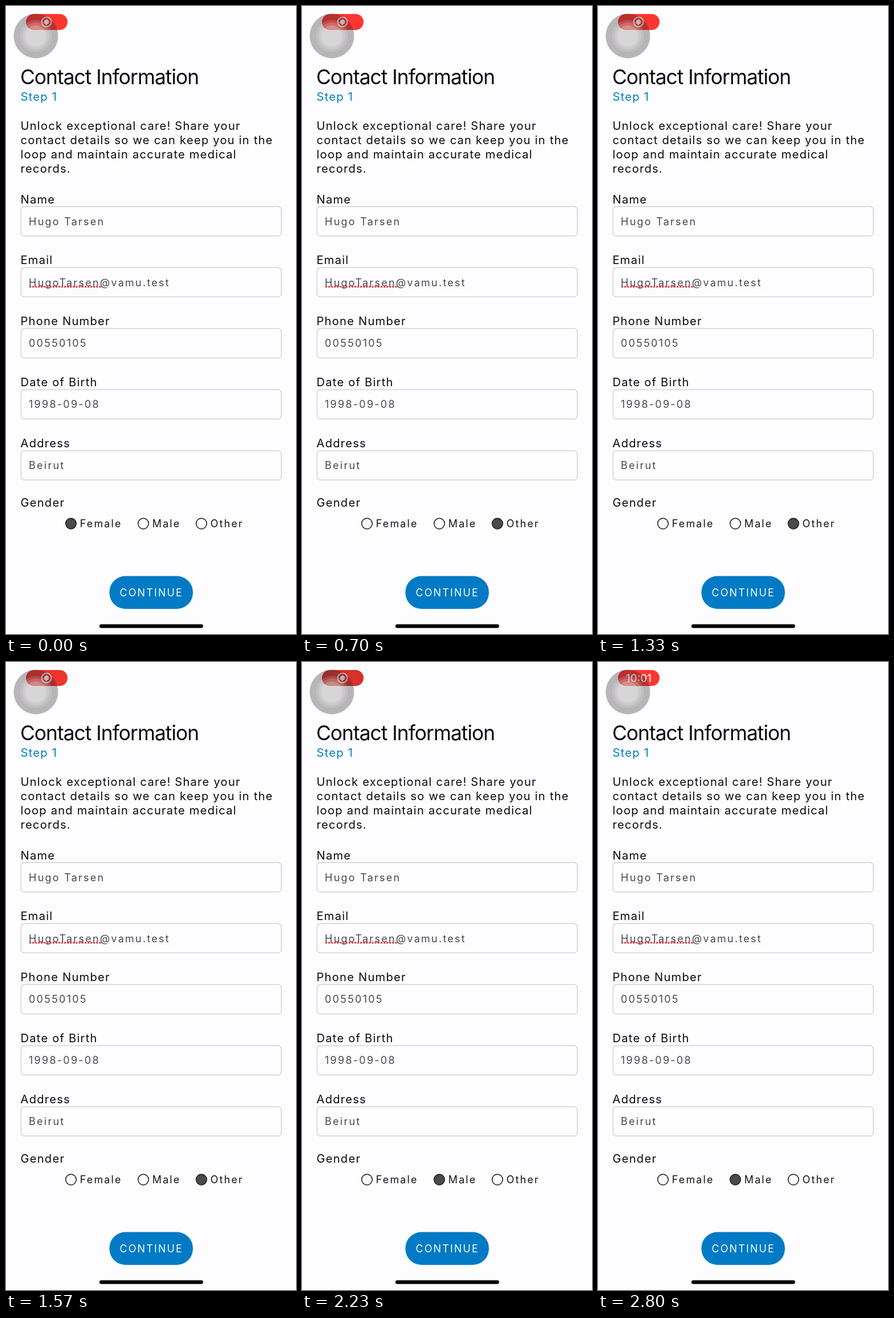
An HTML page that plays this animation: 509 px wide and 1100 px high, repeating every 2830 ms.

```html
<!DOCTYPE html>
<html lang="en">
<head>
<meta charset="utf-8">
<title>Contact form</title>
<style>
  html, body { margin: 0; width: 100%; height: 100%; overflow: hidden; background: #fdfcff; }
  svg { display: block; width: 100%; height: 100%; }
  text { font-family: Inter, Roboto, sans-serif; white-space: pre; }
  .title { font-size: 35.4px; letter-spacing: -1px; fill: #08080a; }
  .body { font-size: 20.2px; letter-spacing: 1.2px; fill: #0c0c0e; }
  .step { fill: #007dbc; }
  .value { font-size: 18px; letter-spacing: 2.25px; fill: #48474b; }
  .option { font-size: 18px; letter-spacing: 2.1px; fill: #131315; }
  .button { font-size: 18px; letter-spacing: 2.1px; fill: #f4faff; }
  .clock { font-size: 18.5px; font-weight: 500; fill: #fff; text-anchor: middle; }
  .box { fill: none; stroke: #d5d1d8; stroke-width: 1.5; }
  .radio { stroke: #19191b; stroke-width: 1.5; }
</style>
</head>
<body>
<svg id="stage" viewBox="0 0 509 1100">
  <rect width="509" height="1100" fill="#fdfcff"/>

  <rect id="pill" x="35" y="14" width="73" height="28" rx="14"/>
  <g id="record">
    <circle cx="71" cy="28" r="8.4" fill="none" stroke="#fff" stroke-width="1.9"/>
    <circle cx="71" cy="28" r="4.4" fill="#fff"/>
  </g>
  <text id="clock" class="clock" x="71.5" y="34.7">10:01</text>

  <g id="touch">
    <circle cx="52.5" cy="52.5" r="39" fill="#2d2628" fill-opacity=".33"/>
    <circle cx="52.5" cy="52.5" r="28" fill="#fff" fill-opacity=".14"/>
    <circle cx="52.5" cy="52.5" r="23.5" fill="#fff" fill-opacity=".16"/>
    <circle cx="52.5" cy="52.5" r="18.5" fill="#fff" fill-opacity=".22"/>
  </g>

  <g id="form"></g>

  <rect x="181.5" y="998.5" width="146.5" height="57.5" rx="28" fill="#007ac5"/>
  <text class="button" x="199.5" y="1033.5">CONTINUE</text>
  <rect x="164" y="1083" width="182" height="6.6" rx="3.3" fill="#050506"/>
</svg>

<script>
const LOOP = 2830;
const $ = id => document.getElementById(id);
const form = $('form');

function add(tag, attrs, content = '') {
  const el = document.createElementNS('http://www.w3.org/2000/svg', tag);
  for (const key in attrs) el.setAttribute(key, attrs[key]);
  el.textContent = content;
  form.appendChild(el);
  return el;
}

const label = (cls, x, y, str) => add('text', { class: cls, x, y }, str);

label('title', 25, 136.8, 'Contact Information');
label('body step', 25.5, 165.5, 'Step 1');

[
  'Unlock exceptional care! Share your',
  'contact details so we can keep you in the',
  'loop and maintain accurate medical',
  'records.'
].forEach((line, i) => label('body', 25.5, 217 + i * 25, line));

[
  ['Name', 'Hugo Tarsen'],
  ['Email', 'HugoTarsen@vamu.test'],
  ['Phone Number', '00550105'],
  ['Date of Birth', '1998-09-08'],
  ['Address', 'Beirut']
].forEach(([name, value], i) => {
  const y = 351 + i * 106.9;
  label('body', 25.5, y - 5.5, name);
  add('rect', { class: 'box', x: 26.3, y: y + .3, width: 457, height: 51.4, rx: 6 });
  label('value', 40, y + 32.6, value);
});

// Spell-check dots under the email user name
add('path', {
  d: 'M42.5 491.7H165', fill: 'none', stroke: '#e2383a',
  'stroke-width': 3.6, 'stroke-linecap': 'round', 'stroke-dasharray': '0 5.1'
});

label('body', 25.5, 877.2, 'Gender');
const radios = [['Female', 114], ['Male', 241], ['Other', 343]].map(([name, x]) => {
  label('option', x + 15.8, 913.4, name);
  return add('circle', { class: 'radio', cx: x, cy: 906.6, r: 9.3 });
});

// [time, amount] pairs: how far the status pill is dimmed
const dim = [[0, 0], [230, .6], [350, .75], [700, .03], [1330, 0],
             [1830, .85], [2050, 1], [2230, .96], [2800, 0], [LOOP, 0]];

const clamp = v => Math.min(1, Math.max(0, v));
const ease = v => (1 - Math.cos(Math.PI * clamp(v))) / 2;
const mix = (a, b, k) => a + (b - a) * k;

function sample(keys, t) {
  const i = Math.max(1, keys.findIndex(k => k[0] > t));
  const [t0, a] = keys[i - 1], [t1, b] = keys[i];
  return mix(a, b, ease((t - t0) / (t1 - t0)));
}

function draw(t) {
  const k = sample(dim, t);
  const rgb = [[253, 212], [55, 48], [48, 41]].map(([a, b]) => Math.round(mix(a, b, k)));
  $('pill').setAttribute('fill', `rgb(${rgb})`);

  const swap = ease((t - 2180) / 400);
  $('record').setAttribute('opacity', 1 - swap);
  $('clock').setAttribute('opacity', swap);

  const picked = t < 470 ? 0 : t < 1580 ? 2 : 1;
  radios.forEach((r, i) => r.setAttribute('fill', i === picked ? '#4a494c' : '#fdfcff'));
}

const start = performance.now();
function tick() {
  draw((performance.now() - start) % LOOP);
  requestAnimationFrame(tick);
}
tick();
</script>
</body>
</html>
```
